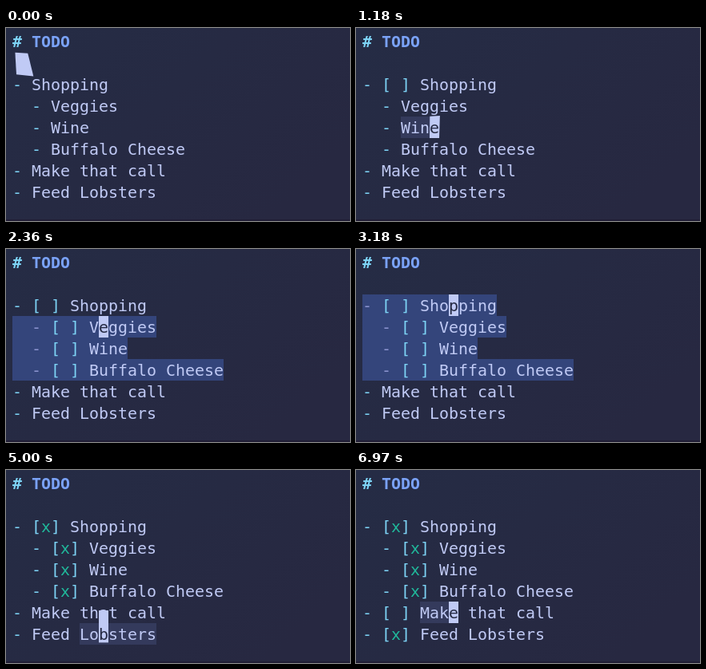
An HTML page that plays this animation: 430x242 px, repeating every 7790 ms.

```html
<!DOCTYPE html>
<html lang="en">
<head>
<meta charset="utf-8">
<title>Todo list</title>
<style>
  html, body { margin: 0; width: 100%; height: 100%; overflow: hidden; background: #252a43; }
  svg { display: block; width: 430px; height: 242px; }
  text { font: 19.93px "DejaVu Sans Mono", monospace; white-space: pre; fill: #c0caf5; }
  .title { font-weight: bold; fill: #7aa2f7; }
  .mark { fill: #7dd3f5; }
  .dim { fill: #8b93cf; }
  .done { fill: #20b89b; }
  .word { fill: #343a5c; }
  .selected { fill: #34457b; }
  #cursor { fill: #c0caf5; }
  #under { fill: #252a43; }
</style>
</head>
<body>
<svg viewBox="0 0 430 242">
  <defs>
    <linearGradient id="shade" x2="1" y2="0.6">
      <stop offset="0" stop-color="#252c45"/>
      <stop offset="1" stop-color="#272841"/>
    </linearGradient>
    <clipPath id="inCursor"><polygon id="clipShape"/></clipPath>
  </defs>
  <rect width="430" height="242" fill="url(#shade)"/>
  <rect y="240" width="430" height="2" fill="#211e36"/>
  <g id="page"></g>
  <polygon id="cursor"/>
  <g clip-path="url(#inCursor)"><text id="under"></text></g>
</svg>
<script>
const LOOP = 7790, CELL = 12, LINE = 27, LEFT = 8, TOP = 3, BASE = 21;
const $ = id => document.getElementById(id);

// row, indent, label, time the box appears, time it is ticked
const items = [
  [2, '', 'Shopping', 560, 3300],
  [3, '  ', 'Veggies', 2150, 3300],
  [4, '  ', 'Wine', 2150, 3300],
  [5, '  ', 'Buffalo Cheese', 2150, 3300],
  [6, '', 'Make that call', 6680, Infinity],
  [7, '', 'Feed Lobsters', 5280, 5790]
];

// time, row, column
const moves = [
  [-1000, 1, 0], [-8, 2, 9], [830, 3, 9], [985, 4, 7], [1230, 5, 9],
  [1610, 4, 8], [1850, 3, 9], [2700, 2, 9], [3853, 3, 9], [4080, 4, 9],
  [4280, 5, 9], [4600, 6, 9], [4943, 7, 9], [6450, 6, 9]
];
const visual = { from: 1480, to: 3600, anchor: 5 };

const xOf = col => LEFT + col * CELL;
const yOf = row => TOP + row * LINE;
const span = (cls, text) => `<tspan class="${cls}">${text}</tspan>`;
const textAt = (row, body) => `<text x="${LEFT}" y="${yOf(row) + BASE}">${body}</text>`;
const band = (cls, row, col, count) =>
  `<rect class="${cls}" x="${xOf(col)}" y="${yOf(row)}" width="${count * CELL}" height="${LINE}"/>`;

function wordAt(line, col) {
  for (const m of line.matchAll(/\w+/g))
    if (col >= m.index && col < m.index + m[0].length) return m;
}

function drawPage(t, since, row, col) {
  const selecting = t >= visual.from && t < visual.to;
  let back = '', front = textAt(0, span('title mark', '#') + span('title', ' TODO'));
  let under = '';
  for (const [r, indent, label, boxed, ticked] of items) {
    const tick = t >= ticked ? 'x' : ' ';
    const box = t >= boxed ? `[${tick}] ` : '';
    const line = `${indent}- ${box}${label}`;
    const selected = selecting && r >= row && r <= visual.anchor;
    if (selected) back += band('selected', r, 0, line.length);
    if (r === row) {
      under = line[col] || '';
      const word = !selecting && since > 30 && wordAt(line, col);
      if (word) back += band('word', r, word.index, word[0].length);
    }
    front += textAt(r, indent + span(selected ? 'dim' : 'mark', '-') + ' ' +
      (box && span('mark', '[') + span('done', tick) + span('mark', ']') + ' ') + label);
  }
  const html = back + front;
  if (html !== drawPage.last) $('page').innerHTML = drawPage.last = html;
  $('under').textContent = under;
  $('under').setAttribute('x', xOf(col));
  $('under').setAttribute('y', yOf(row) + BASE);
}

// Corners facing the direction of travel run ahead, the others trail.
function cursorShape(from, to, since) {
  const dx = (to[2] - from[2]) * CELL, dy = (to[1] - from[1]) * LINE;
  const reach = Math.abs(dx) * CELL / 2 + Math.abs(dy) * LINE / 2;
  return [[-1, -1], [1, -1], [1, 1], [-1, 1]].map(([sx, sy]) => {
    const lead = (1 + (sx * dx * CELL / 2 + sy * dy * LINE / 2) / reach) / 2;
    const tau = 89 - 56 * lead;
    const left = since > 260 ? 0 : Math.exp(-Math.pow(since / tau, 1.5));
    const x = xOf(to[2]) + (sx + 1) * CELL / 2 - dx * left;
    const y = yOf(to[1]) + (sy + 1) * LINE / 2 - dy * left;
    return `${x.toFixed(2)},${y.toFixed(2)}`;
  }).join(' ');
}

function render(t) {
  const i = moves.findLastIndex(m => m[0] <= t);
  const [start, row, col] = moves[i];
  drawPage(t, t - start, row, col);
  const shape = cursorShape(moves[i - 1], moves[i], t - start);
  $('cursor').setAttribute('points', shape);
  $('clipShape').setAttribute('points', shape);
}

const begin = performance.now();
function frame() {
  render((performance.now() - begin) % LOOP);
  requestAnimationFrame(frame);
}
frame();
</script>
</body>
</html>
```
